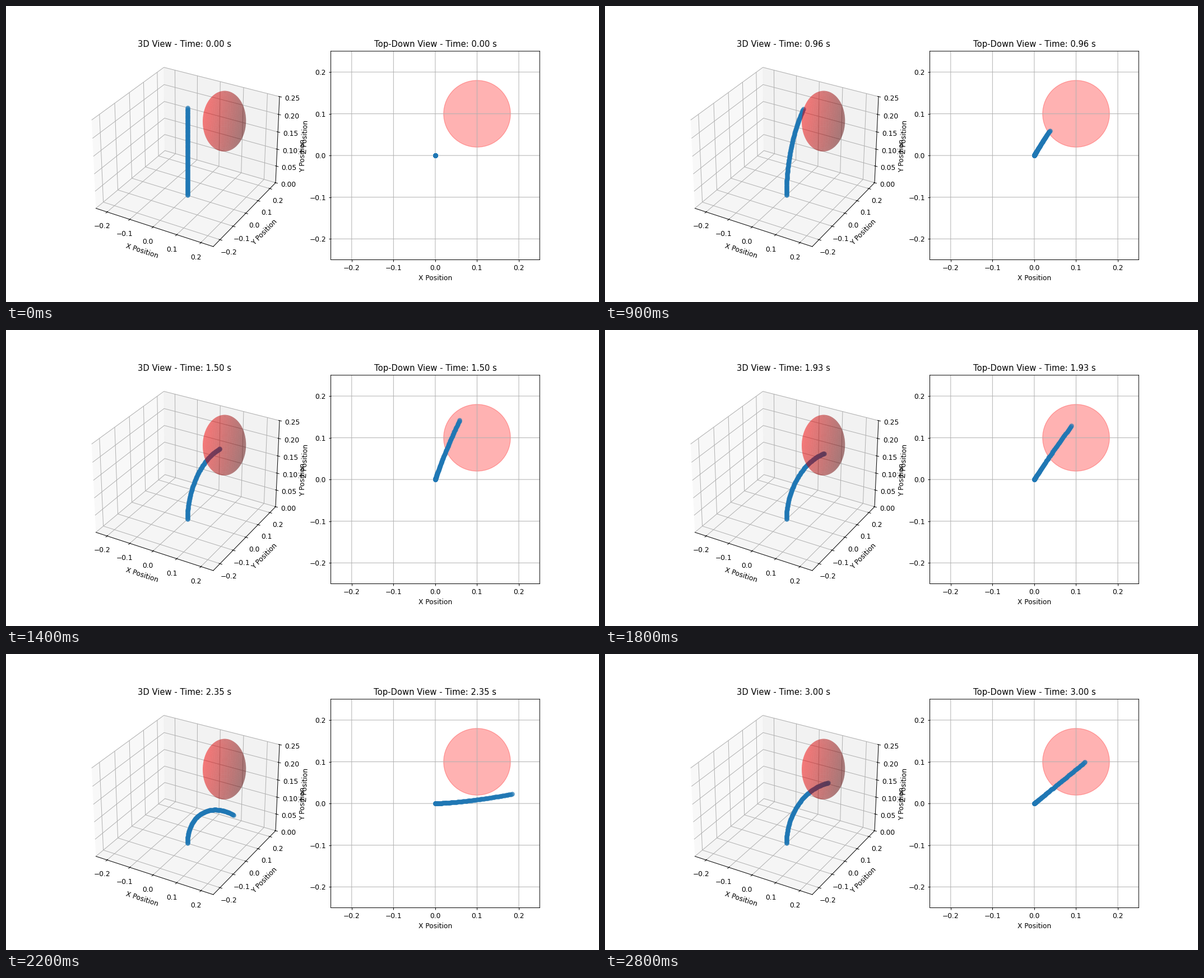
Recreate the animation shown at these times as a matplotlib script. Size 1058 px wide and 529 px high, loop 2.9 s.

```python
import numpy as np
import matplotlib.pyplot as plt
from matplotlib.animation import FuncAnimation

FRAMES, INTERVAL = 29, 100
DURATION, STEPS = 3.0, 1000
ARM_LENGTH, ARM_POINTS = 0.25, 100
CENTER, RADIUS = (0.1, 0.1, 0.2), 0.08
LIMIT = 0.25
REST_HEADING = np.radians(40)

# Turning points of the swing: frame, mean bend (rad), heading (deg)
SWING = [(0, 0, 45), (2.4, 1.3, 45), (5, 0.264, 45), (7, 1.2, 46),
         (9, 0.29, 58.5), (14, 0.737, 68), (18, 0.755, 55.5),
         (22, 1.02, 7), (26, 0.755, 39.2)]
KEYS, BENDS, HEADINGS = np.array(SWING).T

plt.rcParams["path.snap"] = False


def swing_at(frame):
    """Ease in and out between neighbouring turning points."""
    position = np.interp(frame, KEYS, np.arange(len(KEYS)))
    whole = np.floor(position)
    eased = whole + (1 - np.cos(np.pi * (position - whole))) / 2
    order = np.arange(len(KEYS))
    return (np.interp(eased, order, BENDS),
            np.radians(np.interp(eased, order, HEADINGS)))


def arm_shape(frame, fine=4):
    """Integrate the unit tangent; strong bends curl more near the base."""
    bend, heading = swing_at(frame)
    count = (ARM_POINTS - 1) * fine
    u = (np.arange(count) + 0.5) / count
    curl = 1.5 * bend * (0.62 - bend)
    tilt = 2 * (bend - curl / 3) * u + curl * u**2
    turn = heading + 0.3 * (REST_HEADING - heading) * (u - 0.6)
    tangent = np.array([np.sin(tilt) * np.cos(turn),
                        np.sin(tilt) * np.sin(turn),
                        np.cos(tilt)])
    path = np.cumsum(tangent, axis=1) * ARM_LENGTH / count
    return np.hstack([np.zeros((3, 1)), path])[:, ::fine]


def time_at(frame):
    step = frame * (STEPS - 1) // (FRAMES - 1)
    return step * DURATION / (STEPS - 1)


fig = plt.figure(figsize=(12, 6), dpi=88.17)
view = fig.add_subplot(121, projection="3d")
plan = fig.add_subplot(122)
for ax in (view, plan):
    ax.set(xlim=(-LIMIT, LIMIT), ylim=(-LIMIT, LIMIT),
           xlabel="X Position", ylabel="Y Position")

view.set(zlim=(0, LIMIT), zlabel="Z Position")
u = np.linspace(0, 2 * np.pi, 100)
v = np.linspace(0, np.pi, 100)
view.plot_surface(CENTER[0] + RADIUS * np.outer(np.cos(u), np.sin(v)),
                  CENTER[1] + RADIUS * np.outer(np.sin(u), np.sin(v)),
                  CENTER[2] + RADIUS * np.outer(np.ones_like(u), np.cos(v)),
                  color="r", alpha=0.3)

plan.set_aspect("equal")
plan.xaxis.set_major_locator(plt.MultipleLocator(0.1))
plan.yaxis.set_major_locator(plt.MultipleLocator(0.1))
plan.grid(True)
plan.add_patch(plt.Circle(CENTER[:2], RADIUS, color="r", alpha=0.3))

dots = dict(marker="o", linestyle="none", color="C0", alpha=0.6)
arm_3d, = view.plot([], [], [], **dots)
arm_2d, = plan.plot([], [], **dots)


def update(frame):
    x, y, z = arm_shape(frame)
    arm_3d.set_data_3d(x, y, z)
    arm_2d.set_data(x, y)
    label = f"Time: {time_at(frame):.2f} s"
    view.set_title(f"3D View - {label}")
    plan.set_title(f"Top-Down View - {label}")
    return arm_3d, arm_2d


anim = FuncAnimation(fig, update, frames=FRAMES, interval=INTERVAL,
                     init_func=lambda: update(0), repeat=True)
plt.show()
```
